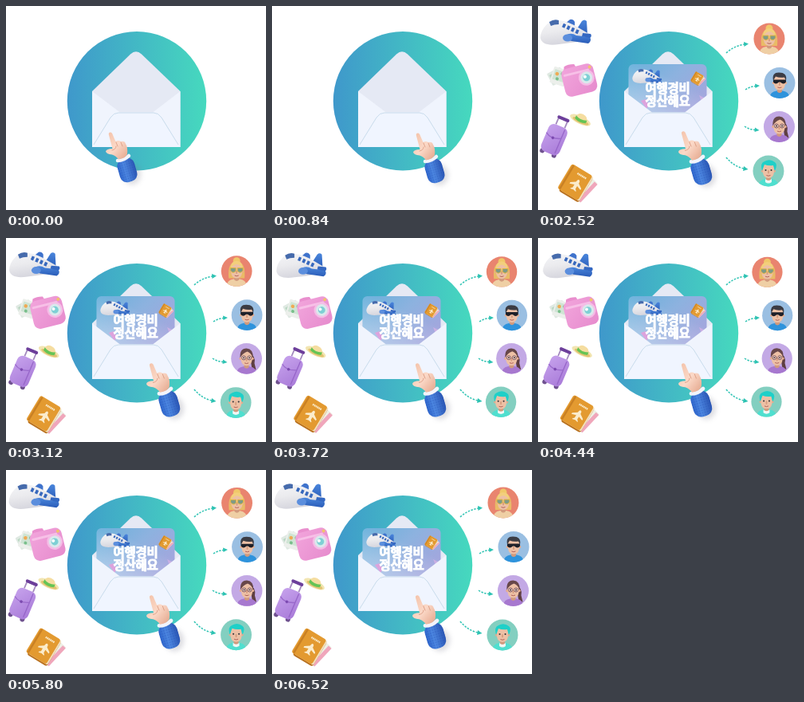
Animation of 326x256 px, one loop 6.56 s. Source, as an HTML page:

```html
<!DOCTYPE html>
<html lang="ko">
<head>
<meta charset="utf-8">
<style>
html, body { margin: 0; width: 100%; height: 100%; overflow: hidden; background: #fff; }
svg { display: block; }
text { font: 900 15.5px "Noto Sans CJK KR", "Noto Sans CJK", sans-serif; letter-spacing: -.3px; text-anchor: middle; fill: #fff; stroke: #fff; stroke-width: .9; }
</style>
</head>
<body>
<svg width="326" height="256" viewBox="0 0 326 256">
<defs>
  <linearGradient id="disc"><stop stop-color="#3f98cb"/><stop offset="1" stop-color="#46d9be"/></linearGradient>
  <linearGradient id="paper" x2="1" y2=".7"><stop stop-color="#69b1db"/><stop offset=".5" stop-color="#8db2df"/><stop offset="1" stop-color="#a5a5dd"/></linearGradient>
  <linearGradient id="haze" x1=".6" y1=".3" x2=".1" y2="1"><stop stop-color="#fff" stop-opacity="0"/><stop offset="1" stop-color="#fff" stop-opacity=".4"/></linearGradient>
  <linearGradient id="sleeve" x2="1"><stop stop-color="#2e66cc"/><stop offset=".4" stop-color="#4c86e0"/><stop offset="1" stop-color="#2a56b4"/></linearGradient>
  <linearGradient id="skin" x2="1" y2="1"><stop stop-color="#f3c0a6"/><stop offset=".5" stop-color="#fbd9c8"/><stop offset="1" stop-color="#e3a489"/></linearGradient>
  <linearGradient id="body" x2=".3" y2="1"><stop stop-color="#f4f5f8"/><stop offset=".5" stop-color="#ebebee"/><stop offset="1" stop-color="#d6d6de"/></linearGradient>
  <linearGradient id="blue" x2="0" y2="1"><stop stop-color="#4a86dc"/><stop offset="1" stop-color="#2a5cb8"/></linearGradient>
  <linearGradient id="pink" x2="1" y2="1"><stop stop-color="#f2a5dc"/><stop offset="1" stop-color="#e68bcd"/></linearGradient>
  <linearGradient id="purple" x2="1" y2="1"><stop stop-color="#c6a2ec"/><stop offset="1" stop-color="#a87ad8"/></linearGradient>
  <pattern id="knit" width="3" height="3" patternUnits="userSpaceOnUse"><circle cx="1.5" cy="1.5" r=".7" fill="#1f46b0" opacity=".4"/></pattern>
  <filter id="soft" x="-50%" y="-50%" width="200%" height="200%"><feGaussianBlur stdDeviation="3"/></filter>
  <clipPath id="pocket"><path d="M100 0H226V176H100z"/></clipPath>
  <clipPath id="wipe"><rect id="wiper" x="230" y="30" width="0" height="190"/></clipPath>
  <clipPath id="face"><circle r="19.5"/></clipPath>

  <g id="plane">
    <path d="M14 -3L21 -14Q24 -17 27 -14L28 4L18 4z" fill="url(#blue)"/>
    <path d="M0 -11L6 -16Q10 -17 12 -13L12 -5z" fill="#3f73cc"/>
    <path d="M-31 7Q-31 -2 -23 -10Q-17 -16 -8 -15Q4 -14 18 -5L30 2Q33 7 29 9Q12 13 -8 15Q-29 18 -31 7z" fill="url(#body)"/>
    <path d="M-20 -13Q-14 -17 -8 -15L-8 -10Q-14 -10 -18 -8z" fill="#466bac"/>
    <path d="M-3 -9L17 0" stroke="#3768bd" stroke-width="5" stroke-dasharray="3.500 2.500"/>
    <path d="M2 3Q8 0 14 4L31 6Q34 11 29 14L8 11Q0 9 2 3z" fill="url(#blue)"/>
    <ellipse cx="3" cy="7" rx="6" ry="4.5" fill="#5b8edd"/>
    <path d="M22 1L32 2Q34 5 31 7L21 5z" fill="#3468c2"/>
  </g>

  <g id="camera">
    <g transform="rotate(-28 -18 -3)"><rect x="-27" y="-12" width="19" height="17" rx="1.5" fill="#dfe9e2"/><path d="M-25 -9h12v11h-12z" fill="#b9d7c2"/></g>
    <g transform="rotate(18 -12 0)"><rect x="-25" y="-13" width="19" height="21" rx="1.5" fill="#ecefeb"/><path d="M-23 -10h14v13h-14z" fill="#cfe4d4"/><circle cx="-19" cy="-5" r="2.300" fill="#efab55"/><circle cx="-13" cy="-7" r="1.800" fill="#8bc59b"/><circle cx="-17" cy="1" r="2" fill="#7abf8c"/></g>
    <g transform="rotate(-14 11 0)">
      <path d="M-6 -14L-4 -20Q2 -22 9 -20L11 -14z" fill="#e98fce"/>
      <rect x="-10" y="-17" width="41" height="36" rx="8" fill="url(#pink)"/>
      <path d="M-6 -9H24" stroke="#f7c0e7" stroke-width="3" stroke-linecap="round"/>
      <circle cx="20" cy="0" r="10" fill="#f5bde6"/><circle cx="20" cy="0" r="7.500" fill="#d9e9ec"/><circle cx="20" cy="0" r="4.500" fill="#7fd0d5"/><circle cx="18.500" cy="-1.500" r="2" fill="#fff"/>
      <circle cx="27" cy="-12" r="2" fill="#f1c36d"/>
    </g>
  </g>

  <g id="case">
    <g transform="translate(-13 6) rotate(23)">
      <path d="M-5 -18V-27H7V-18" fill="none" stroke="#a48abf" stroke-width="1.800"/>
      <path d="M-5 -28H7" stroke="#6d3f9b" stroke-width="4" stroke-linecap="round"/>
      <circle cx="-8" cy="19" r="3" fill="#6f518f"/><circle cx="8" cy="19" r="3" fill="#6f518f"/>
      <rect x="-12" y="-18" width="25" height="37" rx="7" fill="url(#purple)"/>
      <path d="M8 -16V16" stroke="#9665c8" stroke-width="1.300"/>
      <path d="M-12 -4Q-4 2 8 -4" fill="none" stroke="#9a6acb" stroke-width="1.300"/>
      <circle cx="-2" cy="-1" r="1.800" fill="#7c4bb0"/>
    </g>
    <g transform="translate(20 -18) rotate(25)">
      <ellipse rx="14" ry="5" fill="#f2e5b1"/><ellipse cx="1" cy="1" rx="11" ry="3" fill="#e2c372"/>
      <path d="M-7 0Q-7 -8 0 -8Q8 -8 8 0Q0 4 -7 0z" fill="#f5dda0"/>
      <path d="M-7 -3Q0 1 8 -3V1Q0 4 -7 1z" fill="#65c455"/>
    </g>
  </g>

  <g id="passport" transform="rotate(31)">
    <g transform="translate(13 0) rotate(12)"><rect x="-9" y="-15" width="17" height="33" rx="2" fill="#edf0e5"/><path d="M3 -14h5v31h-5z" fill="#f0a6bb"/><path d="M-2 9h6v7h-6z" fill="#8fcda8"/></g>
    <rect x="-14" y="-16" width="29" height="36" rx="3" fill="#b9711e"/><rect x="-13" y="-17" width="28" height="35" rx="2" fill="#f3dfbd"/>
    <rect x="-17" y="-18" width="30" height="36" rx="3" fill="#e39a30"/><path d="M-14 -17V17" stroke="#c98023" stroke-width="2.500"/>
    <path d="M-5 -11H8" stroke="#fbeccb" stroke-width="2.400" stroke-dasharray="1.600 .6"/>
    <path d="M1 -5Q3 -5 3 -1L9 3V5L3 3V7L5 9V10L1 9L-3 10V9L-1 7V3L-7 5V3L-1 -1Q-1 -5 1 -5z" fill="#fbeccb"/>
  </g>

  <g id="head">
    <path d="M-13 22Q-13 11 -4 10H4Q13 11 13 22z"/>
    <path d="M-3 5h6v6q-3 3 -6 0z" fill="#d19a7d"/>
    <circle cx="-7.500" cy="0" r="1.700" fill="#e5ab8d"/><circle cx="7.500" cy="0" r="1.700" fill="#e5ab8d"/>
    <path d="M-7 -5Q-7 -11 0 -11Q7 -11 7 -5V2Q6 9 0 9Q-6 9 -7 2z" fill="#edc0a5"/>
    <path d="M-2.500 5.500Q0 7 2.500 5.500" fill="none" stroke="#b0605a"/>
    <path d="M0 0V2.500" stroke="#d59c7e" stroke-width="1.800" stroke-linecap="round"/>
  </g>
</defs>

<g id="items">
  <g><use href="#plane"/></g><g><use href="#camera"/></g><g><use href="#case"/></g><g><use href="#passport"/></g>
</g>

<circle cx="164" cy="119.200" r="87.200" fill="url(#disc)"/>
<path d="M108 107L156 60.500Q163 54 170 60.500L218.500 107V177H108z" fill="#e5e9f4"/>

<g clip-path="url(#pocket)">
  <g id="card">
    <rect x="113.500" y="73" width="98" height="66" rx="6" fill="url(#paper)"/>
    <rect x="113.500" y="73" width="98" height="66" rx="6" fill="url(#haze)"/>
    <use href="#plane" transform="translate(136.500 88.500) rotate(4) scale(.58)"/>
    <use href="#passport" transform="translate(200 91) scale(.38)"/>
    <path d="M129 119L135 117L139 124L136 129z" fill="#dda3dd"/>
    <path d="M202 112l6 3-2 7z" fill="#c9b0e4"/>
    <text x="162.500" y="108.500">여행경비</text>
    <text x="162.500" y="124.500">정산해요</text>
  </g>
</g>

<path d="M108 107L143 133.500H184L218.500 107V177H108z" fill="#f0f4fd"/>
<path d="M108 177L131 140Q135 134 141 134H185Q191 134 195 140L218.500 177z" fill="#f0f5ff"/>
<path d="M110 174L131 140Q135 134 141 134H185Q191 134 195 140L216 174" fill="none" stroke="#c9dcec"/>

<g clip-path="url(#wipe)" fill="none" stroke="#2ec3b3" stroke-width="1.500" stroke-dasharray="2.400 1.600">
  <path d="M236 59Q246 50 259 48"/><path d="M260 105Q266 101 273 100.500"/>
  <path d="M259 151Q265 155 272 155.500"/><path d="M236 190Q245 201 258 204"/>
  <path d="M258 45l6 2.500-5.500 3.500zM272 97.500l6 2.500-5.500 3zM272 152.500l5.500 3.500-6 2zM258 201l5.500 4-6.500 2z" fill="#2ec3b3" stroke="none"/>
</g>

<g id="people">
  <g><circle r="19.5" fill="#e9846f"/><g clip-path="url(#face)">
    <circle cy="-13" r="4.500" fill="#f0c869"/><path d="M-10 9Q-12 -12 0 -12Q12 -12 10 9z" fill="#e9bb66"/>
    <use href="#head" fill="#efcfa4"/>
    <path d="M-8 -1Q-8 -13 0 -13Q8 -13 8 -1Q6 -8 0 -9Q-6 -8 -8 -1z" fill="#f3cf7c"/>
    <path d="M-8 -4H-1V0Q-5 4 -8 -1zM1 -4H8V-1Q5 4 1 0z" fill="#7f9a86" stroke="#e5b83c"/></g></g>
  <g><circle r="19.5" fill="#9abfe2"/><g clip-path="url(#face)">
    <use href="#head" fill="#2e93dc"/>
    <path d="M-8 -3Q-10 -13 -1 -13Q10 -13 8 -3L6 -7Q0 -6 -5 -8z" fill="#3b3c44"/>
    <path d="M-8 -4H8V-1Q5 3 1 -1H-1Q-5 3 -8 -1z" fill="#1e2029"/></g></g>
  <g><circle r="19.5" fill="#c3a9e5"/><g clip-path="url(#face)">
    <path d="M4 -6Q12 -4 10 6L12 14H7z" fill="#5f3f42"/>
    <use href="#head" fill="#a778cf"/>
    <path d="M-8 -1Q-9 -13 0 -13Q9 -12 8 -1Q6 -7 1 -9Q-5 -7 -8 -1z" fill="#67474a"/>
    <g fill="#f1d5c6" stroke="#7d5560"><circle cx="-3.500" cy="-1" r="2.500"/><circle cx="3.500" cy="-1" r="2.500"/></g>
    <path d="M-3.500 -1h.1M3.500 -1h.1" stroke="#33262b" stroke-width="1.800" stroke-linecap="round"/></g></g>
  <g><circle r="19.5" fill="#83cfc0"/><g clip-path="url(#face)">
    <use href="#head" fill="#4fdfcf"/>
    <path d="M-4 10Q0 14 4 10V14Q0 17 -4 14z" fill="#f3f6f4"/>
    <path d="M-8 0Q-11 -10 -5 -12Q2 -16 8 -11Q12 -8 8 0L6 -7Q0 -6 -5 -8z" fill="#1fd0c8"/>
    <path d="M-3.500 -1h.1M3.500 -1h.1" stroke="#33343a" stroke-width="2" stroke-linecap="round"/></g></g>
</g>

<g id="hand">
  <ellipse cx="210" cy="212" rx="11" ry="13" fill="#778" opacity=".25" filter="url(#soft)"/>
  <g transform="rotate(-16 204 207)"><rect x="193" y="192" width="22" height="30" rx="9" fill="url(#sleeve)"/><rect x="193" y="192" width="22" height="30" rx="9" fill="url(#knit)"/></g>
  <path d="M192 195Q200 195 206 189" fill="none" stroke="#f2f4fb" stroke-width="4.500" stroke-linecap="round"/>
  <path d="M181 163Q180 159.500 183 159.500Q185 159.500 186 163L189.500 171Q193 169 196 171Q201 170 202 174Q205 178 204 187Q202 192 193 193.500Q190 189 185 187.500Q178 187 177 183.500Q178 180 185.500 180z" fill="url(#skin)"/>
  <path d="M190 172L192 177M196 172L198 177M185 182Q190 181 190 177" fill="none" stroke="#d9977e" stroke-width=".8" stroke-linecap="round"/>
</g>
</svg>

<script>
const LOOP = 6560, CENTER = [163, 131];
const byId = id => document.getElementById(id);
const part = (t, from, length) => Math.min(1, Math.max(0, (t - from) / length));
const easeOut = p => 1 - (1 - p) ** 2;
const easeInOut = p => (1 - Math.cos(Math.PI * p)) / 2;
const place = (el, x, y, s = 1) => el.setAttribute("transform", `translate(${x} ${y}) scale(${s})`);

// Resting place, then the shift from which each item flies out.
const items = [[34, 33, 75, 8], [41, 92, 62, -10], [33, 161, 68, 0], [48, 222, 72, -17]];
const people = [[290, 41], [303, 96.5], [302.5, 151.5], [289, 207]];

function draw(t) {
  const move = easeInOut(part(t, 120, 640));
  const grow = .07 * easeInOut(part(t, 860, 240));
  place(byId("hand"), 52 * (move - 1) - 192 * grow, move - 1 - 190 * grow, 1 + grow);

  place(byId("card"), 0, 66 * (1 - easeOut(part(t, 840, 480))));
  byId("wiper").setAttribute("width", 52 * part(t, 1280, 240));

  // Everything around the disc breathes slowly.
  const breath = .99 + .01 * Math.cos((t - 2350) / 4000 * 2 * Math.PI);
  const around = (v, axis) => CENTER[axis] + (v - CENTER[axis]) * breath;

  const fly = easeOut(part(t, 1360, 760));
  byId("items").style.opacity = Math.min(1, fly * 2);
  items.forEach(([x, y, dx, dy], i) =>
    place(byId("items").children[i], around(x, 0) + dx * (1 - fly), around(y, 1) + dy * (1 - fly), (.6 + .4 * fly) * breath));

  const pop = easeOut(part(t, 1440, 620));
  people.forEach(([x, y], i) => place(byId("people").children[i], around(x, 0), around(y, 1), pop * breath));
}

const start = performance.now();
function tick() {
  draw((performance.now() - start) % LOOP);
  requestAnimationFrame(tick);
}
tick();
</script>
</body>
</html>
```
